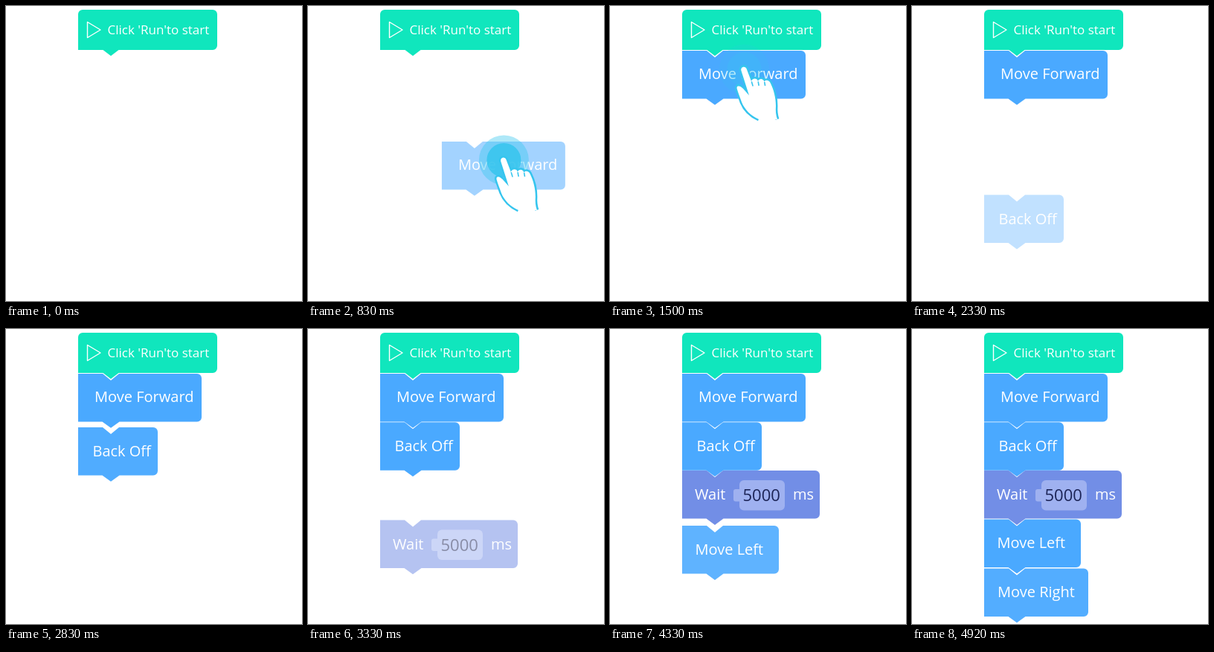
Animation of 398 by 396 pixels, one loop 8 s. Source, as an HTML page:

```html
<!DOCTYPE html>
<html lang="en">
<head>
<meta charset="utf-8">
<title>Stacking code blocks</title>
<style>
  html, body { margin: 0; width: 100%; height: 100%; overflow: hidden; background: #fff; }
  svg { display: block; width: 100%; height: 100%; }
  text { font: 20px "Open Sans", "Noto Sans", sans-serif; fill: #fff; }
</style>
</head>
<body>
<svg viewBox="0 0 398 396">
  <g id="start">
    <path fill="#10e6bd" d="M103 5H278a6 6 0 0 1 6 6V53a6 6 0 0 1 -6 6H151.500L141 67L130.500 59H97V11a6 6 0 0 1 6 -6Z"/>
    <path d="M109.500 21.500L127 32L109.500 42.500Z" fill="none" stroke="#fff" stroke-width="1.400" stroke-linejoin="round"/>
    <text x="136.500" y="38" style="font-size:17px">Click 'Run'to start</text>
  </g>
  <g id="blocks"></g>
  <g id="hand">
    <g id="touch" fill="#35c5ee">
      <circle cx="83.500" cy="25" r="33.500" opacity=".4"/>
      <circle cx="83.500" cy="25" r="23" opacity=".85"/>
    </g>
    <g transform="translate(-180 -182)" stroke="#35c5ee" fill="none" stroke-linejoin="round">
      <path fill="#fff" stroke-width="5" style="paint-order:stroke"
        d="M283 274C272 269 264 261 260 251C258 245 255.500 239 254 234C252.500 230 255 228 259 230.500C263 233 266 238 270 242L259.500 209C258 204 264 201.500 266.500 206L273 223C274 218.500 281 218 282 223C283 219 289 218.500 290.500 223.500C292 221 297 221 299 226C303 234 306 245 306 256C305.500 263 306 268 308 274"/>
      <path stroke-width="1.600" stroke-linecap="round" d="M273.500 224l1.500 5M282.300 224l.8 4.500M290.800 224.500l.7 4"/>
    </g>
  </g>
</svg>
<script>
const NS = 'http://www.w3.org/2000/svg';
const LEFT = 97, LOOP = 8000, FPS = 12, LAST_MOVE = 4917;
const BLUE = '#4aa9ff';
const $ = id => document.getElementById(id);

const blocks = [
  { y: 60,    w: 166, color: BLUE, labels: [[22, 'Move Forward']] },
  { y: 125.2, w: 107, color: BLUE, labels: [[19.5, 'Back Off']], from: 2250, to: 3000, rise: 165, power: 2.13 },
  { y: 190.1, w: 185, color: '#728ee6', labels: [[17, 'Wait'], [149, 'ms']], field: '5000', from: 3167, to: 3833, rise: 118, power: 2 },
  { y: 255.4, w: 130, color: BLUE, labels: [[17.5, 'Move Left']], from: 4000, to: 4500, rise: 60, power: 1.76 },
  { y: 321.4, w: 140, color: BLUE, labels: [[18, 'Move Right']], from: 4667, to: 5000, rise: 0, power: 2 }
];

function add(parent, tag, attrs, text) {
  const el = parent.appendChild(document.createElementNS(NS, tag));
  for (const key in attrs) el.setAttribute(key, attrs[key]);
  if (text) el.textContent = text;
  return el;
}

function build(b) {
  const g = add($('blocks'), 'g', {});
  add(g, 'path', {
    fill: b.color,
    d: `M0 0H33L44 9L55 0H${b.w - 6}a6 6 0 0 1 6 6V58.500a6 6 0 0 1 -6 6H55.500L44 72.800L32.500 64.500H0Z`
  });
  if (b.field) {
    const pale = add(g, 'g', { fill: '#9fb1f0' });
    add(pale, 'rect', { x: 77, y: 13, width: 61, height: 40.5, rx: 6 });
    add(pale, 'rect', { x: 69, y: 25, width: 12, height: 16.5, rx: 3 });
    add(g, 'text', { x: 81.5, y: 41, style: 'font-size:22px;fill:#1c2456' }, b.field);
  }
  for (const [x, label] of b.labels) add(g, 'text', { x, y: 38 + (b.y > 60 ? 1 : 0) }, label);
  b.el = g;
}

const clamp = v => Math.max(0, Math.min(1, v));

// Linear interpolation through [time, value] pairs
function track(t, keys) {
  let value = keys[0][1];
  for (let i = 1; i < keys.length; i++) {
    const [t0, a] = keys[i - 1], [t1, b] = keys[i];
    if (t >= t0) value = a + (b - a) * clamp((t - t0) / (t1 - t0));
  }
  return value;
}

// Height left to drag: steady at first, then slowing down
function dragLeft(t) {
  if (t <= 833) return track(t, [[583, 207], [833, 122]]);
  if (t >= 1333) return track(t, [[1333, 10.7], [1416, 0]]);
  const s = t - 833;
  return 122 - 0.34 * s + 0.0002348 * s * s;
}

function place(el, x, y, opacity) {
  el.setAttribute('transform', `translate(${x.toFixed(2)} ${y.toFixed(2)})`);
  el.setAttribute('opacity', opacity.toFixed(3));
}

function draw(t) {
  const shown = t >= 583;
  const dy = dragLeft(t), x = LEFT + dy * 0.68, y = blocks[0].y + dy;
  place(blocks[0].el, x, y, shown ? track(t, [[583, 0.15], [833, 0.5], [1416, 1]]) : 0);
  place($('hand'), x, y, shown ? track(t, [[583, 0.4], [750, 1], [1500, 1], [2000, 0]]) : 0);
  $('touch').setAttribute('opacity', track(t, [[1333, 1], [1500, 0.4], [1750, 0]]));

  for (const b of blocks.slice(1)) {
    const left = Math.pow(1 - clamp((t - b.from) / (b.to - b.from)), b.power);
    place(b.el, LEFT, b.y + b.rise * left, t >= b.from - 1 ? 1 - 0.85 * left : 0);
  }
}

blocks.forEach(build);
const begin = performance.now();

function tick() {
  const t = (performance.now() - begin) % LOOP;
  const step = Math.floor((t + 4) * FPS / 1000) * 1000 / FPS;
  draw(Math.min(step, LAST_MOVE));
  requestAnimationFrame(tick);
}
tick();
</script>
</body>
</html>
```
